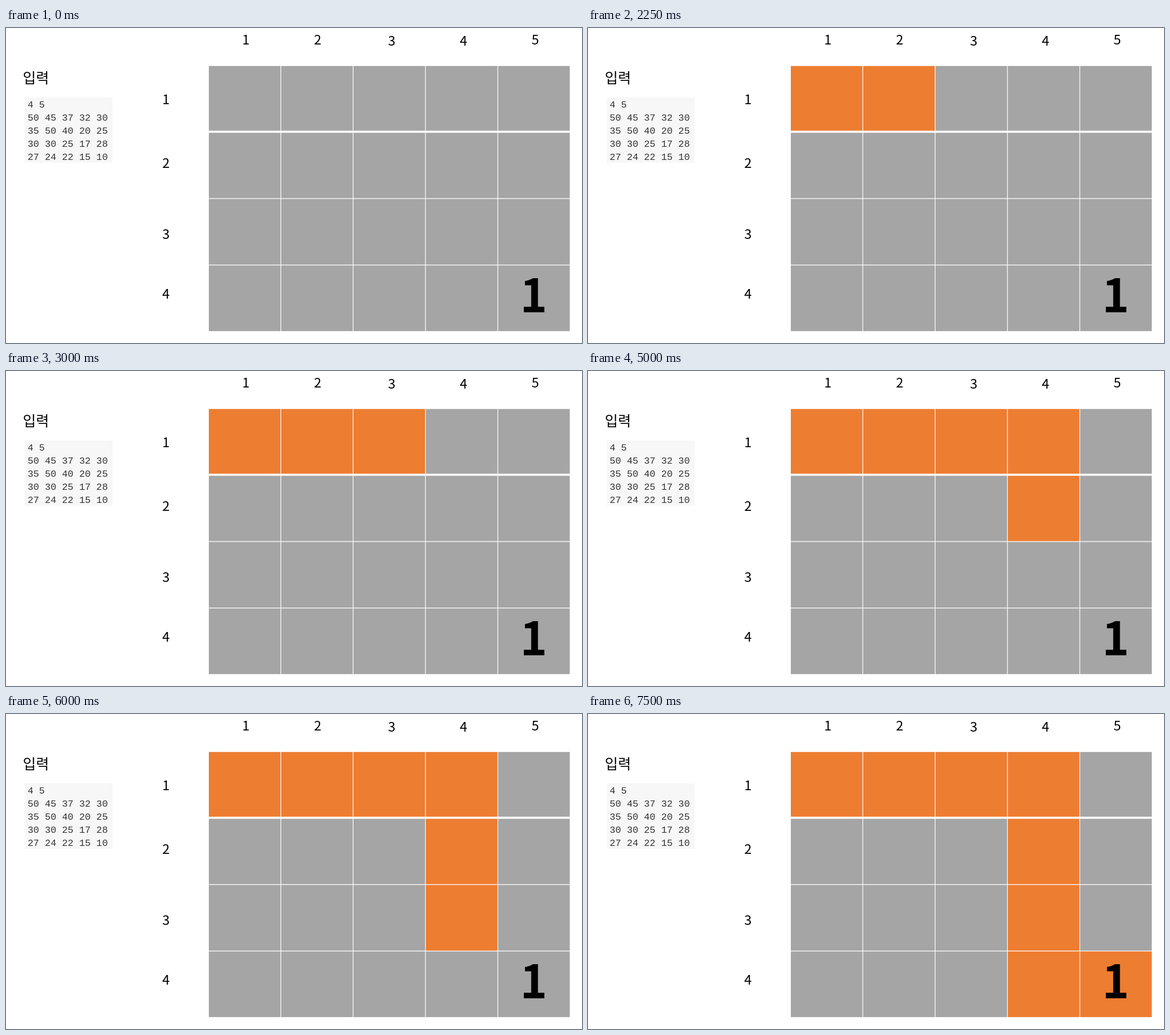
An HTML page that plays this animation: 1011x554 px, repeating every 8000 ms.

```html
<!DOCTYPE html>
<html lang="ko">
<head>
<meta charset="utf-8">
<style>
  html, body { margin: 0; width: 100%; height: 100%; overflow: hidden; background: #fff; }
  svg { display: block; }
  text { font-family: "Noto Sans CJK KR", "Noto Sans CJK", "Noto Sans", sans-serif; font-weight: 300; white-space: pre; }
  .label { font-size: 23.5px; text-anchor: middle; }
  .title { font-size: 25px; }
  .big { font-size: 81px; font-weight: 700; text-anchor: middle; }
  .code { font: 16.75px "Liberation Mono", monospace; fill: #333; }
</style>
</head>
<body>
<svg id="stage" width="1011" height="554" viewBox="0 0 1011 554"></svg>
<script>
const GRAY = "#a5a5a5", ORANGE = "#ed7d31", LOOP = 8000;
const COLS = 5, ROWS = 4, CELL_W = 126.95, CELL_H = 116.9;
const stage = document.getElementById("stage");

function add(tag, attrs, content = "") {
  const el = document.createElementNS("http://www.w3.org/2000/svg", tag);
  for (const key in attrs) el.setAttribute(key, attrs[key]);
  el.textContent = content;
  return stage.appendChild(el);
}
const rect = (x, y, width, height, fill) => add("rect", { x, y, width, height, fill });
const text = (cls, x, y, content) => add("text", { class: cls, x, y }, content);

// Input panel
text("title", 29.5, 96.5, "입력");
rect(33, 122, 154, 115, "#f7f7f7");
["4 5", "50 45 37 32 30", "35 50 40 20 25", "30 30 25 17 28", "27 24 22 15 10"]
  .forEach((line, i) => text("code", 38, 140.3 + 23 * i, line));

// Grid, with a thicker gap below the first row
const cells = Array.from({ length: ROWS }, (_, row) =>
  Array.from({ length: COLS }, (_, col) =>
    rect(356 + CELL_W * col, 66.8 + CELL_H * row, CELL_W - 1.2, CELL_H - 1.3, GRAY)));
rect(355, 180.6, 637, 3.7, "#fff");
text("big", 926.2, 500, "1");

// Column labels step down and back up in pairs
for (let i = 0; i < COLS; i++)
  text("label", 421 + 126 * i + (i > 1 ? 4 : 0), 28.7 + 2 * (i >> 1 & 1), i + 1);
[134, 245.6, 370.6, 476].forEach((y, i) => text("label", 280.7, y, i + 1));

// Walk from the top left: each move lights the next cell at its time
const times = [1250, 2250, 3000, 4000, 5000, 6000, 6750, 7500];
const moves = "RRRDDDR";
let row = 0, col = 0;
const path = times.map((time, i) => {
  const step = { time, cell: cells[row][col] };
  if (moves[i] === "R") col++;
  else row++;
  return step;
});

const start = performance.now();
function draw(now) {
  const t = Math.max(0, now - start) % LOOP;
  for (const { time, cell } of path)
    cell.setAttribute("fill", t >= time ? ORANGE : GRAY);
  requestAnimationFrame(draw);
}
draw(start);
</script>
</body>
</html>
```
